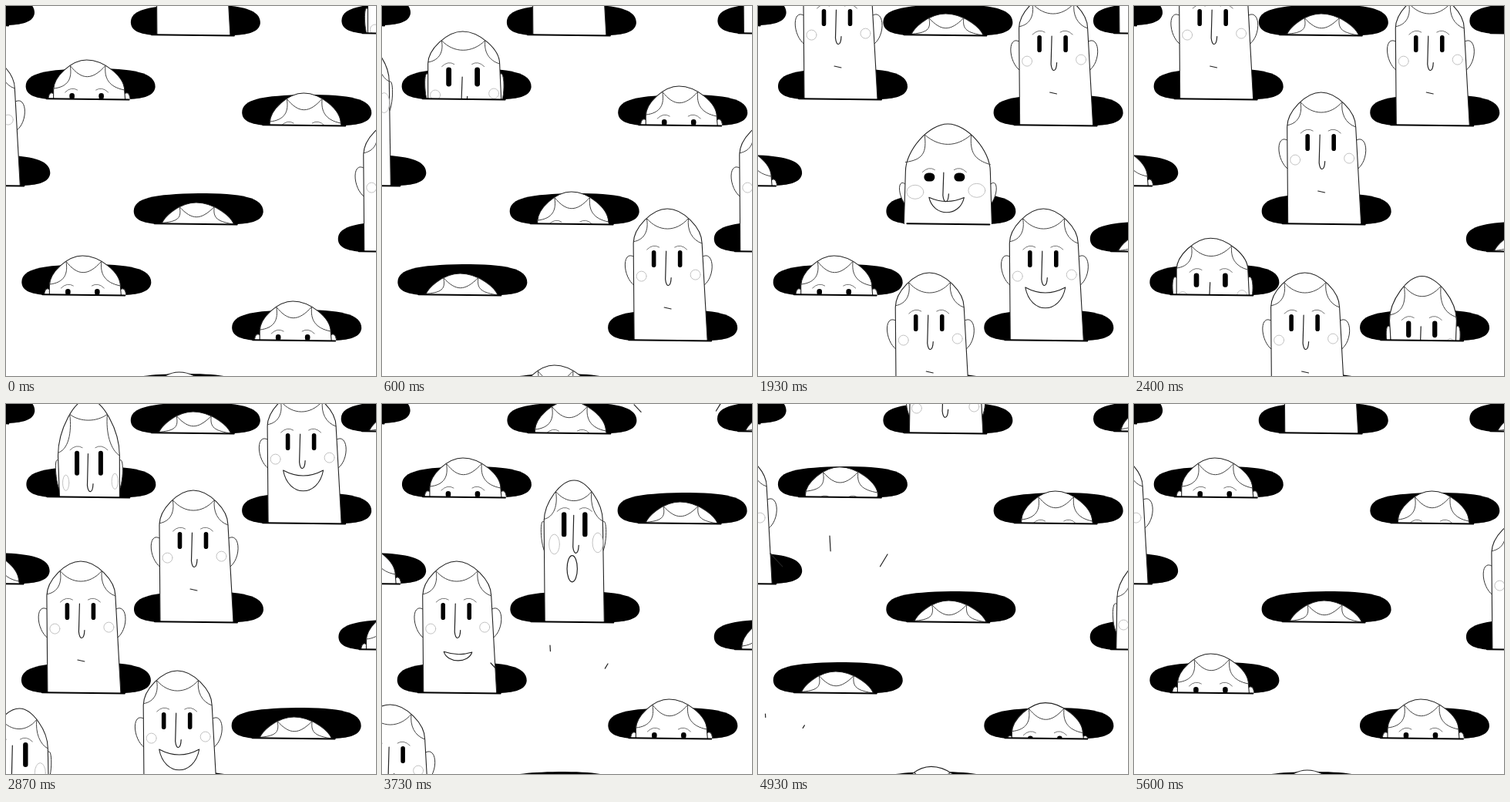
Recreate the animation shown at these times as an HTML page with a canvas. Size 480 by 480 pixels, loop 5.74 s.

```html
<!DOCTYPE html>
<html lang="en">
<head>
<meta charset="utf-8">
<title>Heads in holes</title>
<style>
html, body { margin: 0; width: 100%; height: 100%; overflow: hidden; background: #fff; }
canvas { display: block; }
</style>
</head>
<body>
<canvas id="stage" width="480" height="480"></canvas>
<script>
const g = document.getElementById('stage').getContext('2d');
const LOOP = 5740, BLEND = 130, LINES = 400;

// Pose: h height, d dome depth, c crown x, sl/sr shoulders, bl/br base,
// ey/em/eg eye line, middle and half gap, rx/ry eye size, ny nose top, my mouth line,
// s smile, o open mouth, eb/el ear width and length, kx/ky cheeks, jx/je hair joint and end
const full = { h: 171, d: 45, c: -7, sl: -51, sr: 38, bl: -50, br: 45, ey: 65, em: -7.5, eg: 17,
  rx: 2.8, ry: 11, ny: -10, my: 129, s: 0, o: 0, eb: 11, el: 37, kx: 6.5, ky: 6.5, jx: 0.61, je: 0.95 };
const pose = (base, change) => ({ ...base, ...change });
const peek = pose(full, { h: 51, d: 39, c: -5, sl: -48, sr: 44, bl: -48, br: 45, ey: 47, em: -5, eg: 19,
  rx: 3.3, ry: 4, ny: 8, eb: 7, jx: 0.5 });
const stretch = pose(full, { h: 187, d: 52, c: -1, sl: -40, sr: 36, bl: -39, br: 38, ey: 56, em: -0.5, eg: 13.5,
  rx: 3.2, ry: 16, ny: -12, my: 113, o: 1, eb: 4, kx: 7, ky: 13 });
const poses = {
  full, peek, stretch,
  grin: pose(full, { s: 1 }),
  half: pose(peek, { h: 42, c: -4 }),
  low: pose(peek, { h: 28, d: 34, c: -3, sl: -49, sr: 47, jx: 0.47, je: 0.78 }),
  pop: pose(full, { h: 88, d: 42, c: -5, sl: -50, sr: 43, ey: 59, em: -4.5, eg: 18.5, rx: 3.4, ry: 12.5, ny: 0, eb: 4 }),
  tall: pose(full, { h: 215, d: 90, sl: -46, sr: 39, bl: -50, br: 47, ey: 80, ry: 14, my: 145, eb: 8 }),
  lift: pose(stretch, { h: 166, em: -9, eg: 16, ey: 60, o: 0 }),
  squash: pose(full, { h: 130, d: 62, c: -4, sl: -59, sr: 51, bl: -61, br: 53, ey: 69, em: -8.5, eg: 19.5,
    rx: 7, ry: 5.5, ny: -6, my: 115, s: 0.85, eb: 7, el: 25, kx: 11, ky: 9, jx: 0.55, je: 0.8 }),
  crouch: pose(full, { h: 110, d: 52, c: -4, sl: -45, sr: 41, bl: -53, br: 48, ey: 58, em: -6.5, eg: 19.5,
    rx: 5, ry: 7.5, ny: 5, my: 102, s: 0.72, eb: 0, kx: 0, ky: 0 }),
  sink: pose(stretch, { h: 125, d: 75, c: -4, sl: -43, sr: 37, bl: -41, br: 37, ey: 85, em: -3, eg: 15.5,
    rx: 3, o: 0, my: 150, kx: 4, ky: 10 })
};

// Whole moves: each expands into poses at offsets from its time
const moves = {
  up: [['pop', 0], ['tall', 130], ['full', 270]],
  down: [['crouch', -200], ['stretch', 0], ['sink', 70], ['low', 140]]
};

// Back to front: centre x, ground y, script
const holes = [
  [-47, 25, 'low:0'],
  [519, 36, 'up:0 down:2400 half:4200 low:5000'],
  [246, 38, 'down:1300 half:3500 peek:4200 up:4900'],
  [110, 121, 'up:600 down:2800 peek:3500 low:4200 peek:5000'],
  [390, 155, 'peek:600 up:1400 grin:2700 down:3500 half:4900'],
  [-27, 233, 'down:600 peek:1700 half:2700 peek:3500 up:4200'],
  [250, 283, 'half:600 up:1200 grin:1600 squash:1930 full:2130 down:3730'],
  [515, 319, 'down:1300 peek:2700 half:3500 peek:4200 up:4900'],
  [104, 375, 'low:600 peek:1600 up:2450 grin:3780 down:4530 peek:5300'],
  [377, 434, 'up:200 grin:1500 down:2300 peek:3500 half:4200 peek:5000'],
  [229, 517, 'peek:600 up:1400 grin:2700 down:3240 peek:4200 half:5000'],
  [18, 561, 'pop:2730 lift:2866 full:3070 down:4750']
].map(([x, y, script]) => {
  const steps = script.split(' ').map(s => s.split(':')).map(([name, t]) => [name, +t]);
  return {
    x, y,
    keys: steps.flatMap(([name, t]) => (moves[name] || [[name, 0]]).map(([p, dt]) => ({ p: poses[p], t: t + dt }))),
    drop: (steps.find(s => s[0] === 'down') || [0, -LOOP])[1] + 150
  };
});

const mix = (a, b, u) => a + (b - a) * u;

function poseAt(keys, t) {
  const n = keys.length;
  let i = keys.findIndex(k => k.t > t);
  const wrap = i < 0;
  if (wrap) i = 0;
  const next = keys[i], prev = keys[(i + n - 1) % n];
  const end = next.t + (wrap ? LOOP : 0);
  const span = i && !wrap ? Math.min(BLEND, next.t - prev.t) : BLEND;
  const u = Math.max(0, 1 - (end - t) / span);
  return Object.fromEntries(Object.keys(full).map(k => [k, mix(prev.p[k], next.p[k], u)]));
}

function ink(color, width, draw) {
  g.beginPath();
  draw();
  g.strokeStyle = color;
  g.lineWidth = width;
  g.stroke();
}

function oval(x, y, rx, ry) {
  g.moveTo(x + rx, y);
  g.ellipse(x, y, rx, ry, 0, 0, 7);
}

function drawHole() {
  g.fillStyle = '#000';
  g.beginPath();
  g.moveTo(-84, -17);
  g.bezierCurveTo(-84, -34, -58, -39, 0, -40);
  g.bezierCurveTo(56, -40, 84, -35, 84, -16);
  g.bezierCurveTo(83, -5, 70, -1, 50, 0);
  g.lineTo(-50, 0);
  g.bezierCurveTo(-75, -1, -84, -7, -84, -17);
  g.fill();
}

function drawHead(p) {
  const top = -p.h, shoulder = top + p.d, foot = Math.max(0, shoulder);
  const eye = top + p.ey, wl = p.c - p.sl, wr = p.sr - p.c;
  const side = (a, b, y) => mix(a, b, Math.min(1, Math.max(0, (y - shoulder) / (foot - shoulder || 1))));
  g.save();
  g.beginPath();
  g.rect(-120, -400, 240, 400);
  g.clip();
  g.fillStyle = '#fff';

  // ears
  if (p.eb > 0.5) for (const [a, b, dir] of [[p.sl, p.bl, -1], [p.sr, p.br, 1]]) {
    const y1 = eye + 34 - p.el, y2 = eye + 34, x1 = side(a, b, y1), x2 = side(a, b, y2), out = dir * p.eb * 1.35;
    ink('#333', 1, () => {
      g.moveTo(x1, y1);
      g.bezierCurveTo(x1 + out, y1 - 8, x2 + out, y2 - 12, x2, y2);
      g.fill();
    });
  }

  ink('#222', 1.1, () => {
    const bend = shoulder - p.d * 0.45;
    g.moveTo(p.bl, foot);
    g.lineTo(p.sl, shoulder);
    g.bezierCurveTo(p.sl, bend, p.c - wl * 0.45, top, p.c, top);
    g.bezierCurveTo(p.c + wr * 0.45, top, p.sr, bend, p.sr, shoulder);
    g.lineTo(p.br, foot);
    g.fill();
  });

  // hair scallops
  ink('#444', 1, () => {
    const xl = p.c - wl * p.jx, xr = p.c + wr * p.jx, y = k => top + p.d * k;
    const joint = y(0.74 * p.jx * p.jx), dip = top + Math.min(p.d, 45) * 0.68;
    g.moveTo(p.sl, y(p.je));
    g.bezierCurveTo(xl - 2, y(p.je - 0.05), xl + 3, y(0.6), xl, joint);
    g.bezierCurveTo(xl + wl * 0.35, dip, xr - wr * 0.35, dip, xr, joint);
    g.bezierCurveTo(xr - 2, y(0.6), xr + 4, y(p.je - 0.05), p.sr, y(p.je + 0.05));
  });

  const brow = eye - p.ry - 5;
  ink('#666', 0.9, () => {
    for (const dir of [-1, 1]) {
      const x = p.em + dir * (p.eg + 1);
      g.moveTo(x - 8, brow + (dir < 0 ? 4 : 1));
      g.quadraticCurveTo(x, brow - 4, x + 8, brow + (dir < 0 ? 1 : 4));
    }
  });

  if (p.kx > 1) ink('#bbb', 0.9, () => {
    const y = eye + 16 + p.ry * 0.6;
    oval(p.em - 2 * p.eg + 1, y, p.kx, p.ky);
    oval(p.em + 2 * p.eg + 3, y - 2, p.kx, p.ky);
  });

  const tip = eye + 29 + p.ry / 2;
  ink('#222', 1.2, () => {
    g.moveTo(p.em - 1, eye + p.ny);
    g.lineTo(p.em - 2, tip - 8);
    g.bezierCurveTo(p.em - 1, tip + 3, p.em + 5, tip + 3, p.em + 5.5, tip - 10);
  });

  g.fillStyle = '#000';
  g.beginPath();
  for (const dir of [-1, 1]) {
    const x = p.em + dir * p.eg;
    g.roundRect(x - p.rx, eye - p.ry, p.rx * 2, p.ry * 2, [Math.min(p.rx, p.ry)]);
  }
  g.fill();

  // mouth
  const mx = p.em + 1 + 2 * p.s, my = top + p.my;
  if (p.o > 0.2) {
    ink('#222', 1.2, () => oval(mx - 4, my, 7 * p.o, 18 * p.o));
  } else {
    const half = 4.5 + 21.5 * p.s, lift = 26 * p.s * p.s;
    ink('#222', 1.1, () => {
      g.moveTo(mx - half, my - lift - 1);
      g.quadraticCurveTo(mx, my - lift * 0.5, mx + half, my - lift + 1 - 2 * p.s);
      if (p.s > 0.1) {
        g.bezierCurveTo(mx + half * 0.75, my + lift / 3, mx - half * 0.75, my + lift / 3, mx - half, my - lift - 1);
      }
    });
  }
  g.restore();
}

// Three dashes that fly off where a head has just vanished
function drawDashes(u) {
  if (u < 0 || u >= 1) return;
  const far = Math.min(1, u * 2);
  ink('#222', 1.2, () => {
    for (const [x1, y1, x2, y2] of [[-45, -135, -88, -181], [-8, -150, -11, -204], [38, -137, 64, -180]]) {
      g.moveTo(mix(x1, x2, u), mix(y1, y2, u));
      g.lineTo(mix(x1, x2, far), mix(y1, y2, far));
    }
  });
}

function render(ms) {
  // drawn at 15 pictures per second, the last one held
  const step = Math.min(84, Math.floor((Math.floor(ms / 10) * 10 + 3.4) * 0.015));
  const t = step * 1000 / 15;
  g.fillStyle = '#fff';
  g.fillRect(0, 0, 480, 480);
  g.lineCap = g.lineJoin = 'round';
  holes.forEach(({ x, y, keys }, i) => {
    g.save();
    g.translate(x + 0.4 * Math.sin(step * 2.1 + i * 1.7), y);
    drawHole();
    drawHead(poseAt(keys, t));
    ink('#000', 2, () => { g.moveTo(-57, -0.7); g.lineTo(50, 0.4); });
    g.restore();
  });
  for (const { x, y, drop } of holes) {
    g.save();
    g.translate(x, y);
    drawDashes((t - drop) / LINES);
    g.restore();
  }
}

const start = performance.now();
function tick() {
  render((performance.now() - start) % LOOP);
  requestAnimationFrame(tick);
}
tick();
</script>
</body>
</html>
```
